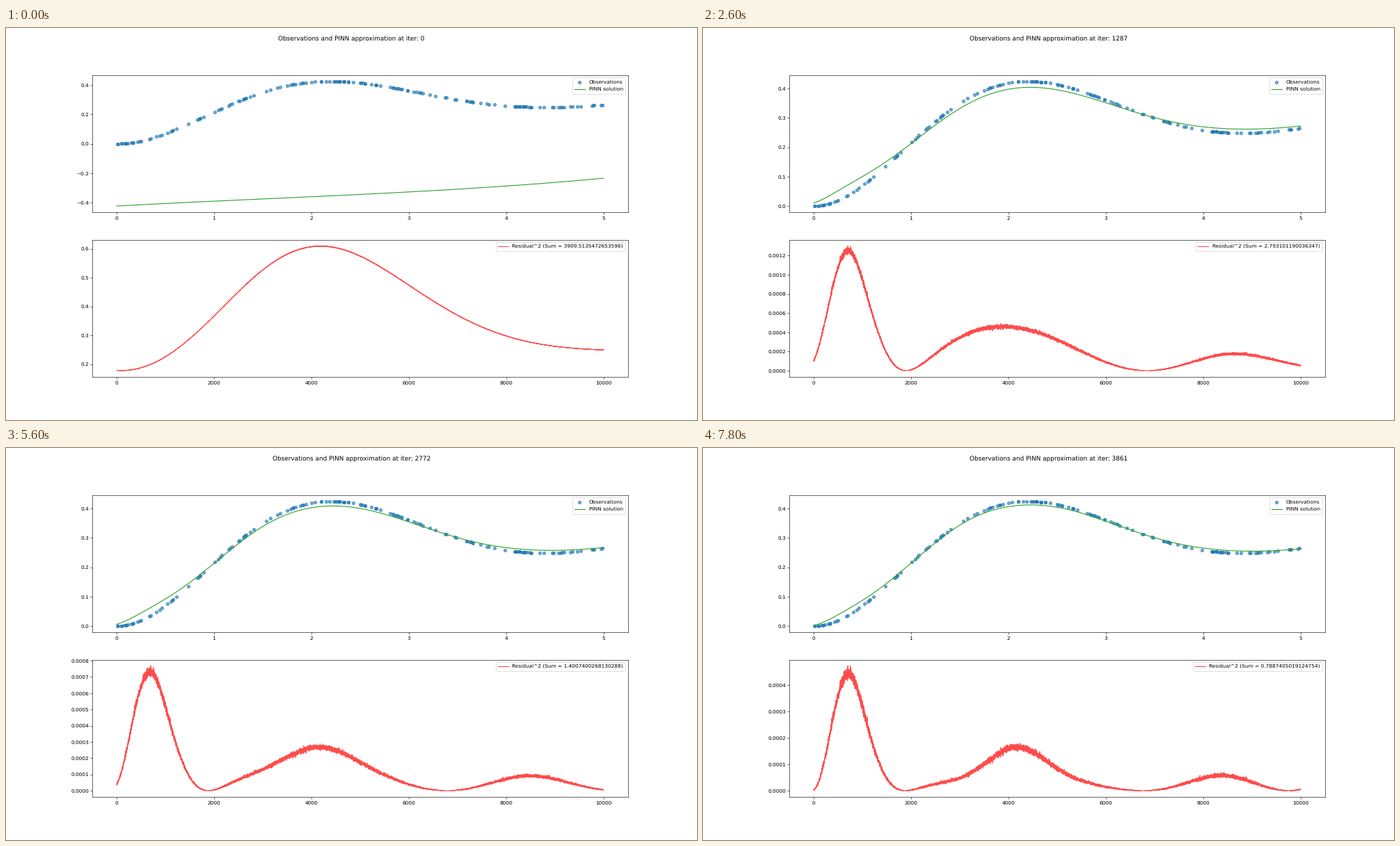
Write a matplotlib script that moves like this. It is 993 by 564 pixels and loops after 8000 ms.

```python
import numpy as np
import matplotlib.pyplot as plt
from matplotlib.animation import FuncAnimation

W, H = 993, 564
DPI = W / 18.53
FRAMES, INTERVAL, ITER_STEP = 40, 200, 99
N = 10000

plt.rcParams["text.hinting"] = "none"

rng = np.random.default_rng(4)
t = np.linspace(0, 5, N)
noise = rng.normal(0, 2.4e-4, N)


def response(t, level=0.3002, damp=0.4, freq=1.428):
    """Step response of a damped oscillator."""
    wave = np.cos(freq * t) + damp / freq * np.sin(freq * t)
    return level * (1 - np.exp(-damp * t) * wave)


def spline(xk, yk, x):
    """Natural cubic spline through the knots."""
    h, n = np.diff(xk), len(xk)
    a, b = np.eye(n), np.zeros(n)
    for i in range(1, n - 1):
        a[i, i - 1:i + 2] = h[i - 1], 2 * (h[i - 1] + h[i]), h[i]
        b[i] = 6 * ((yk[i + 1] - yk[i]) / h[i] - (yk[i] - yk[i - 1]) / h[i - 1])
    m = np.linalg.solve(a, b)
    i = np.clip(np.searchsorted(xk, x) - 1, 0, n - 2)
    p, q = (xk[i + 1] - x) / h[i], (x - xk[i]) / h[i]
    bend = ((p**3 - p) * m[i] + (q**3 - q) * m[i + 1]) * h[i]**2 / 6
    return p * yk[i] + q * yk[i + 1] + bend


truth = response(t)
obs_t = rng.uniform(0, 5, 150)
obs_y = response(obs_t)

# fit error in thousandths at a few times, per training stage
knots = np.array([0, .175, .35, .6, .95, 1.5, 2.05, 2.6, 3.4, 4.2, 5])
trained = {
    396: [0, 30, 41.2, 35.2, 8.5, -27.5, -36.6, -24, 8.6, 19.8, -18.9],
    990: [9.5, 28.1, 37.1, 26.6, 0, -20.5, -22.3, -17, -1, 14.1, 7.7],
    1683: [10.7, 27.8, 33, 21.5, -.5, -16, -19.9, -16, 0, 11.5, 6.7],
    3861: [1.5, 15.2, 21, 13.5, -.3, -6.9, -12.8, -7.9, .2, 7.6, -2.2],
}
untrained = -0.423 + 0.036 * t - 0.004 * t**2 + 0.00087 * t**3
fits = {0: untrained - truth, 99: 0.17 + 0.035 * t - truth}
for stage, row in trained.items():
    fits[stage] = spline(knots, np.array(row) / 1000, t)
stages = list(fits)

# running total shown in the legend
total_iters = [0, 99, 396, 990, 1683, 2376, 3168, 3861]
totals = [3909.5135472653596, 78.20461735290418, 5.63333323038785,
          3.155005054302378, 2.3105627043483055, 1.672196246305443,
          1.1292838073206146, 0.7887405019124754]


def error_at(it):
    """Blend the two nearest stages; early training slows into each stage."""
    i = min(np.searchsorted(stages, it, side="right") - 1, len(stages) - 2)
    a, b = stages[i], stages[i + 1]
    w = (it - a) / (b - a)
    if b <= 990:
        w = 1 - (1 - w)**2
    return fits[a] * (1 - w) + fits[b] * w


# the tiny margin keeps the pixel size from rounding down
fig, (top, low) = plt.subplots(
    2, 1, figsize=((W + 1e-6) / DPI, (H + 1e-6) / DPI), dpi=DPI)
title = fig.suptitle("")


def draw(frame):
    it = frame * ITER_STEP
    err = error_at(it)
    total = float(np.interp(it, total_iters, totals))
    title.set_text(f"Observations and PINN approximation at iter: {it}")

    top.clear()
    top.scatter(obs_t, obs_y, alpha=0.65, label="Observations")
    top.plot(t, truth + err, color="tab:green", label="PINN solution")
    top.legend(loc="upper right")

    low.clear()
    low.plot((err - noise)**2, color="red", alpha=0.7,
             label=f"Residual^2 (Sum = {total})")
    low.legend(loc="upper right")
    return []


anim = FuncAnimation(fig, draw, frames=FRAMES, interval=INTERVAL,
                     init_func=lambda: draw(0), repeat=True, repeat_delay=0)
plt.show()
```
